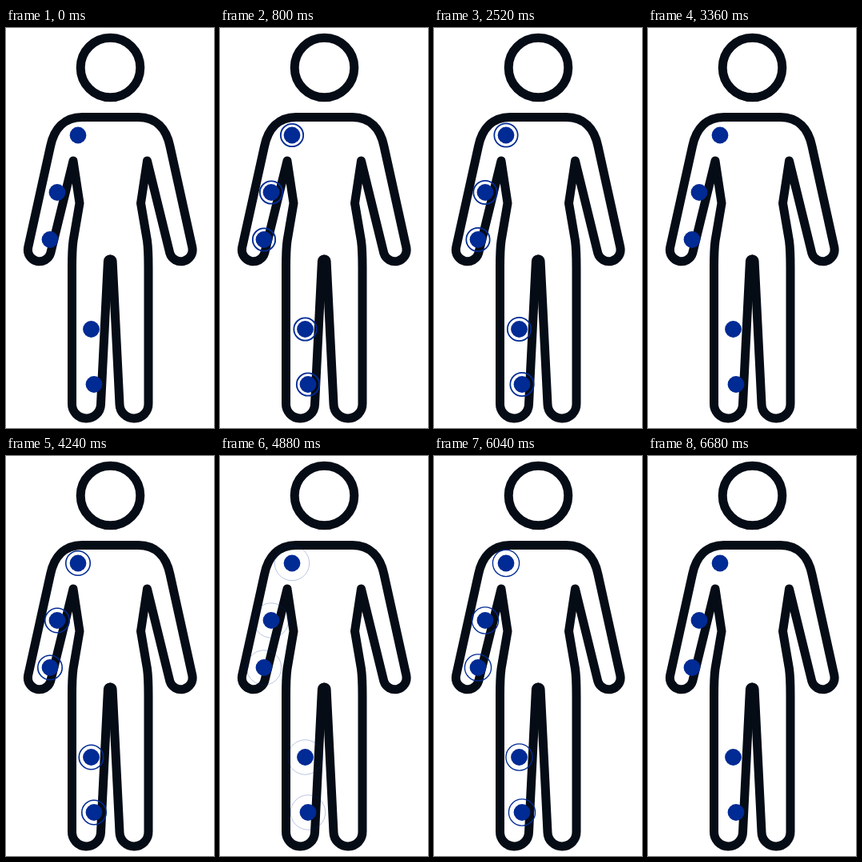
Recreate the animation shown at these times as an HTML page. Size 260x500 px, loop 7 s.

```html
<!DOCTYPE html>
<html lang="en">
<head>
<meta charset="utf-8">
<title>Body with pulsing points</title>
<style>
  html, body { margin: 0; width: 100%; height: 100%; overflow: hidden; background: #fff; }
  svg { display: block; width: 260px; height: 500px; }
  .body { fill: none; stroke: #050c16; stroke-width: 11; stroke-linecap: round; stroke-linejoin: round; }
  .dot { fill: #002a94; }
  .ring { fill: none; stroke: #002a94; }
</style>
</head>
<body>
<svg viewBox="0 0 260 500">
  <defs>
    <path id="half" d="M130.25 111.5H95C73 111.5 60 126 55.5 148L27.6 274.5
      A14.5 14.5 0 0 0 55.7 281.5L84 166L92 219L84 266Q82.5 277 82.5 300V469.5
      A18 18 0 0 0 118.5 470.5L127.4 291.5Q127.6 289 130.25 289"/>
  </defs>
  <g class="body">
    <circle cx="130.5" cy="49.5" r="37.3"/>
    <use href="#half"/>
    <use href="#half" transform="matrix(-1 0 0 1 260.5 0)"/>
  </g>
  <g id="points"></g>
</svg>
<script>
const LOOP = 7000, STEP = 40;
const FIRST = 250, PERIOD = 5000 / 3, PULSE = 1425, PULSES = 4;
const RADIUS = [8.6, 23], WIDTH = [3, 0];
const POINTS = [[90, 134], [64, 205.5], [55, 264.5], [106.5, 376.5], [110, 445.5]];

const layer = document.getElementById('points');

function addCircle(className, [cx, cy], r) {
  const circle = document.createElementNS('http://www.w3.org/2000/svg', 'circle');
  const attrs = { class: className, cx, cy, r };
  for (const name in attrs) circle.setAttribute(name, attrs[name]);
  return layer.appendChild(circle);
}

const rings = POINTS.map(point => addCircle('ring', point, 0));
POINTS.forEach(point => addCircle('dot', point, 10.4));

const mix = ([a, b], p) => a + (b - a) * p;

function draw() {
  const time = Math.floor((performance.now() % LOOP) / STEP) * STEP;
  const index = Math.floor((time - FIRST) / PERIOD);
  const progress = (time - FIRST - index * PERIOD) / PULSE;
  const active = index >= 0 && index < PULSES && progress < 1;
  for (const ring of rings) {
    ring.setAttribute('r', active ? mix(RADIUS, progress) : 0);
    ring.setAttribute('stroke-width', active ? mix(WIDTH, progress) : 0);
  }
  requestAnimationFrame(draw);
}
draw();
</script>
</body>
</html>
```
